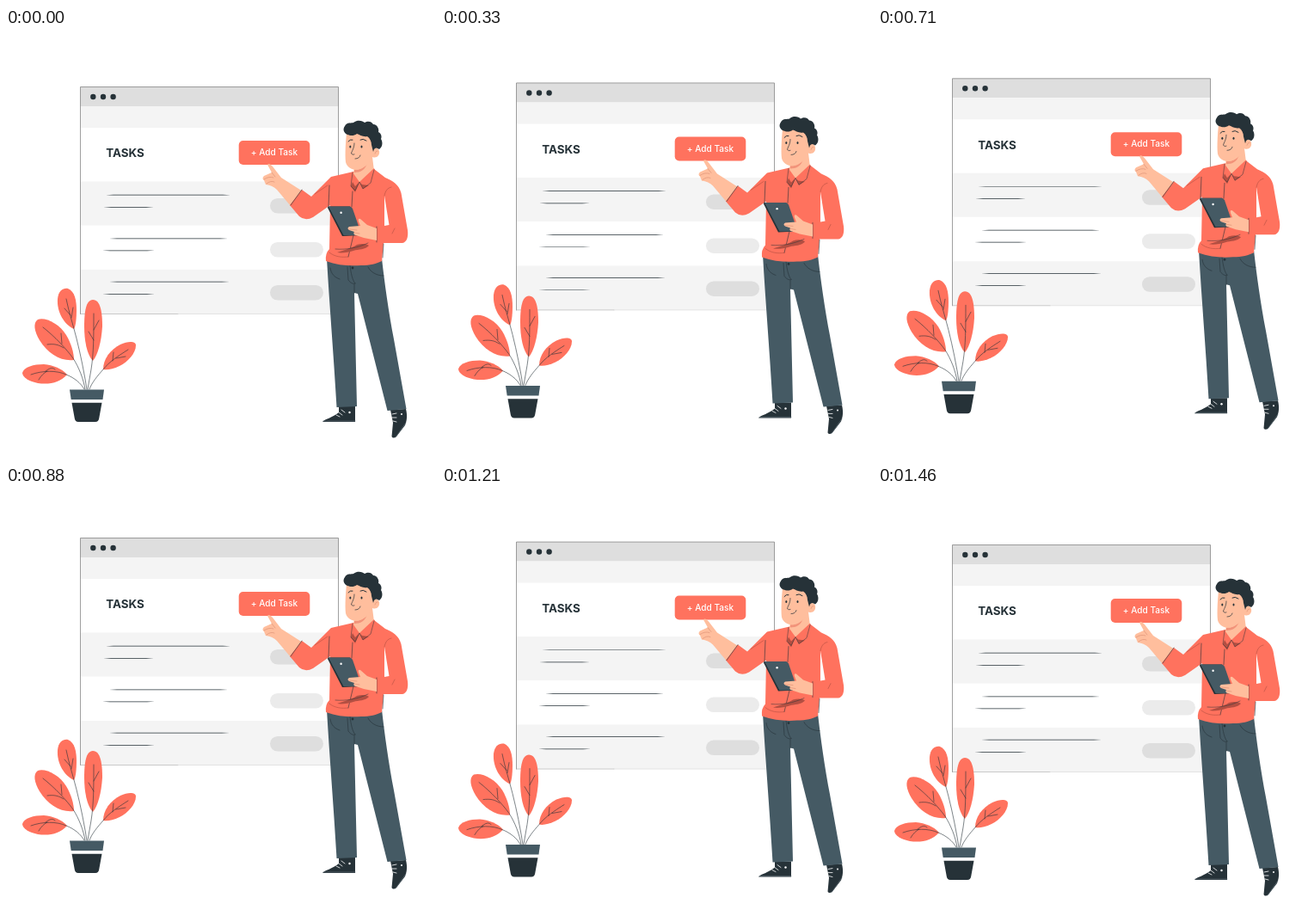
An HTML page with a canvas for the animation above (1500 ms loop, 500 px wide and 500 px high).

```html
<!DOCTYPE html>
<html lang="en">
<head>
<meta charset="utf-8">
<title>Task board</title>
<style>
html, body { margin: 0; width: 100%; height: 100%; overflow: hidden; background: #fff; }
canvas { display: block; width: 100vw; height: 100vh; }
</style>
</head>
<body>
<canvas></canvas>
<script>
const canvas = document.querySelector('canvas');
const ctx = canvas.getContext('2d');

const CORAL = '#ff725e', DARK = '#263238', SLATE = '#455a64', SKIN = '#ffbe9d', MAROON = '#b34f42';
const LOOP = 1500, STEPS = 36, RISE = 10;

function fill(color, d) {
  ctx.fillStyle = color;
  ctx.fill(new Path2D(d));
}

function line(d, width = 0.6, color = DARK) {
  ctx.strokeStyle = color;
  ctx.lineWidth = width;
  ctx.stroke(new Path2D(d));
}

function rect(color, x, y, w, h, r = 0) {
  ctx.fillStyle = color;
  ctx.beginPath();
  ctx.roundRect(x, y, w, h, r);
  ctx.fill();
}

function oval(color, x, y, rx, ry = rx) {
  ctx.fillStyle = color;
  ctx.beginPath();
  ctx.ellipse(x, y, rx, ry, 0, 0, Math.PI * 2);
  ctx.fill();
}

function text(str, x, y, font, color) {
  ctx.font = font + ' Inter, sans-serif';
  ctx.fillStyle = color;
  ctx.fillText(str, x, y);
}

// A line that thins out towards both ends
function rule(x1, x2, y) {
  fill(DARK, `M${x1} ${y} L${x1 + 9} ${y - 0.35} H${x2 - 9} L${x2} ${y} L${x2 - 9} ${y + 0.35} H${x1 + 9}Z`);
}

function drawBoard() {
  rect('#fff', 86.5, 68.5, 300, 264);
  rect('#dedede', 86.5, 68.5, 300, 22.5);
  rect('#f4f4f4', 86.5, 91, 300, 25);
  rect('#f4f4f4', 86.5, 178.5, 300, 51);
  rect('#f4f4f4', 86.5, 281, 300, 51.5);
  line('M86.5 332.5 V68.5 H386.5 V332', 0.7, '#777');
  line('M86.5 332.5 H200', 0.6, '#aaa');
  line('M200 332.5 H386', 0.6, '#d5d5d5');
  for (const x of [101.3, 113, 124.6]) oval(DARK, x, 80, 3.2);

  text('TASKS', 116.2, 150.4, '700 13.4px', DARK);
  rect(CORAL, 270.7, 131, 82.6, 28, 5);
  text('+ Add Task', 284.7, 148.2, '500 10.1px', '#fff');

  rule(116, 261, 194.2);
  rule(113, 172, 208.4);
  rule(120, 258, 244.9);
  rule(112, 173, 258.8);
  rule(120, 260, 295.1);
  rule(112, 173, 309.3);
  rect('#dedede', 307, 198, 62, 17.5, 8.75);
  rect('#ebebeb', 307, 249, 62, 17.5, 8.75);
  rect('#dedede', 307, 299, 62, 17.5, 8.75);
}

function drawPlant() {
  fill(CORAL, 'M79 350 C68 345 59 331 60 315 C61 305 67 302 72 303 C80 306 82 317 82 328 C82 338 81 347 79 350Z');
  fill(CORAL, 'M101 387 C94 380 91 363 91 347 C91 330 93 316 101 316 C110 316 112 331 112 347 C111 364 107 380 101 387Z');
  fill(CORAL, 'M79 386 C64 388 49 379 39 363 C33 353 31 343 37 339 C46 336 62 344 70 357 C76 367 79 378 79 386Z');
  fill(CORAL, 'M71 403 C63 412 51 415 37 413 C27 411 19 406 19 401 C21 394 32 391 44 391 C55 392 65 396 71 403Z');
  fill(CORAL, 'M113 397 C113 385 121 374 133 368 C142 364 151 364 151 369 C151 378 142 388 132 393 C124 397 117 398 113 397Z');

  line('M70 315 C73 330 78 345 82 361 C87 381 91 401 94 420');
  line('M68 326 L75 334 M78 325 L76 337');
  line('M102 332 C102 358 102 378 99 397 L95 420');
  line('M96 353 L102 363 M108 340 L102 351');
  line('M43 348 C57 359 70 373 78 384 C85 395 90 408 92 420');
  line('M48 368 C56 367 61 368 67 372 M64 355 L65 367');
  line('M29 403 C43 398 59 398 70 403 C80 407 87 413 91 420');
  line('M46 399 C54 393 55 396 57 397 M38 409 C41 404 44 401 48 399');
  line('M142 374 C131 381 120 388 113 397 C106 405 100 412 97 420');
  line('M125 377 L124 387 M139 382 L128 384');

  fill(SLATE, 'M74 420.5 H114 L112.5 432 H75.7Z');
  fill(DARK, 'M76.5 435.8 H111.5 L108.2 454 Q107.5 458 104 458 H84 Q80.5 458 79.8 454Z');
}

function drawLegs() {
  fill(DARK, 'M387 440 L406 440 L406 458 H368 C370 455 380 453 387 447Z');
  fill(DARK, 'M447 444 L465 443 C467 451 466 457 464 462 L454 475 Q450 478 448.5 475 L450 459Z');
  line('M369 457 H406', 0.6, '#687780');
  line('M465 459 L453 476', 0.6, '#687780');
  line('M387 447 l4 3 M390 444 l4 3 M384 450 l4 2 M449 449 l5 -1 M449 453 l5 0 M450 457 l4 1', 0.8, '#fff');
  oval('#fff', 399.5, 447, 1.2);
  oval('#fff', 460, 449, 1);

  fill(SLATE, 'M373 268 L437 268 C440 295 445 331 451 362 L465.5 443 L443.5 445 L409 309 L405 308 L408 440 L384.5 441 C381 380 376 320 373 268Z');
  line('M400 276 C401 285 403 294 406 297 M397 278 L398 293 C401 297 404 298 406 297 M377 279 C378 286 382 290 388 292 M421 278 C424 284 431 288 439 288');
  line('M405 308 L405 298');
  oval(DARK, 403, 279, 1.4);
}

function drawShirt() {
  // Pointing hand
  fill(SKIN, 'M345 190 L320 174 L310 161 Q306 156 304 159 L309 168 L300 172 Q297 175 300 177 L302 182 Q310 183 315 188 L331 207Z');
  line('M309 168 L313 173 M300 176 Q306 172 311 174 M303 181 Q308 177 312 179', 0.6, '#d98d73');

  fill(CORAL, 'M404 167 L378 173 L355 196 L344 188 L330 206 L341 219 Q348 225 357 220 L377 206 L376 257 Q371 262 372 271 C386 276 400 277 413 276 C423 276 431 274 437 271 L439 250 L461 250 C466 249 468 243 467 235 L459.5 192 C457 182 450 178 441 174 L428 164Z');
  // Gap between body and sleeve
  fill('#fff', 'M440 195 L445.5 229 L440 230Z');
  line('M344 188 L331 206 M376 183 L375 208');
  line('M403 190 L402 208 M404 241 L398 266 M431 231 L431 249 M439 251 L438 267');
  line('M448 185 C443 186 441 190 440 195 M449 239 L452 233 M359 193 L374 183 M376 261 C382 266 390 267 398 266', 0.6, MAROON);
  fill(MAROON, 'M385 261 C393 258 402 256 408 252 C414 250 420 251 422 253 C418 258 410 257 404 259 C398 261 390 262 385 261Z');
  line('M383 257 C395 258 408 256 421 250', 0.5);
}

function drawHead() {
  fill(SKIN, 'M405 158 L404 170 L411 181 L428 166 L426 150Z');
  fill('#f2937a', 'M405 165 C412 165 417 162 420 157 C418 165 412 168 405 168Z');
  fill(SKIN, 'M396 122 C395 132 394 147 395 156 C397 164 407 167 414 163 C420 160 424 155 426 150 C431 152 435 148 434 143 C433 139 430 139 427 140 L426 121Z');

  fill(DARK, 'M397 124 C393 122 391 118 394 114 C396 109 402 111 404 110 C409 106 415 108 417 110 C422 107 426 110 427 112 C432 112 434 118 433 121 C437 123 437 127 436 129 C439 134 437 139 434 141 Q430 138 428 141 L427 144 L425 136 C425 132 423 128 420 126 C415 127 411 124 408 123 C404 126 400 125 397 124Z');

  line('M398 132 Q400 129 403 130 M412 130 Q415 128 419 131', 1);
  oval(DARK, 400.3, 138, 1, 1.5);
  oval(DARK, 413.5, 138, 1, 1.5);
  line('M405 134 C405 140 402 143 401.5 146 Q403 148 405 147 M406 152 Q411 152 412 148', 0.7);
  line('M429 146 q1 -4 3 -3', 0.6, '#d98d73');

  fill(CORAL, 'M403 168 L401 184 L406 190 L411 180 L415 187 L424 183 L430 169 L428 163 L411 179Z');
  fill(MAROON, 'M401 184 L403 179 L406 184 L411 179 L406 191Z M411 179 L415 187 L422 183 L414 182Z');
  line('M403 168 L401 184 L406 189 L411 179 L415 187 L424 180 L428 165', 0.5);
}

function drawTablet() {
  fill(DARK, 'M374 209 Q374 207 376 207.5 L400 207.5 L413 241 L391 242Z');
  fill(SLATE, 'M375 207.5 H400 Q402 208 403 210 L413 239 Q413 241 411 241 H392.5Z');
  oval('#fff', 389.6, 214.7, 1.2);
  fill(SKIN, 'M431 233 L420 229 L412 222 Q409 221 410 225 L412 230 L399 231 Q396 233 399 235 L405 237 Q403 240 407 241 L416 244 L431 247Z');
  line('M399 234 L408 235 M405 238 L411 239', 0.6, '#d98d73');
}

function liftAt(time) {
  const step = Math.floor((time % LOOP) / LOOP * STEPS + 0.1) % STEPS;
  const half = (STEPS - 1) / 2;
  return RISE * (1 - Math.abs(step - half) / half);
}

function resize() {
  const ratio = devicePixelRatio || 1;
  canvas.width = Math.round(innerWidth * ratio);
  canvas.height = Math.round(innerHeight * ratio);
}

let start;
function draw(now) {
  start ??= now;
  ctx.setTransform(1, 0, 0, 1, 0, 0);
  ctx.fillStyle = '#fff';
  ctx.fillRect(0, 0, canvas.width, canvas.height);
  ctx.scale(canvas.width / 500, canvas.height / 500);
  ctx.translate(0, -liftAt(now - start));
  ctx.lineCap = ctx.lineJoin = 'round';
  drawBoard();
  drawPlant();
  drawLegs();
  drawShirt();
  drawHead();
  drawTablet();
  requestAnimationFrame(draw);
}

addEventListener('resize', resize);
resize();
requestAnimationFrame(draw);
</script>
</body>
</html>
```
